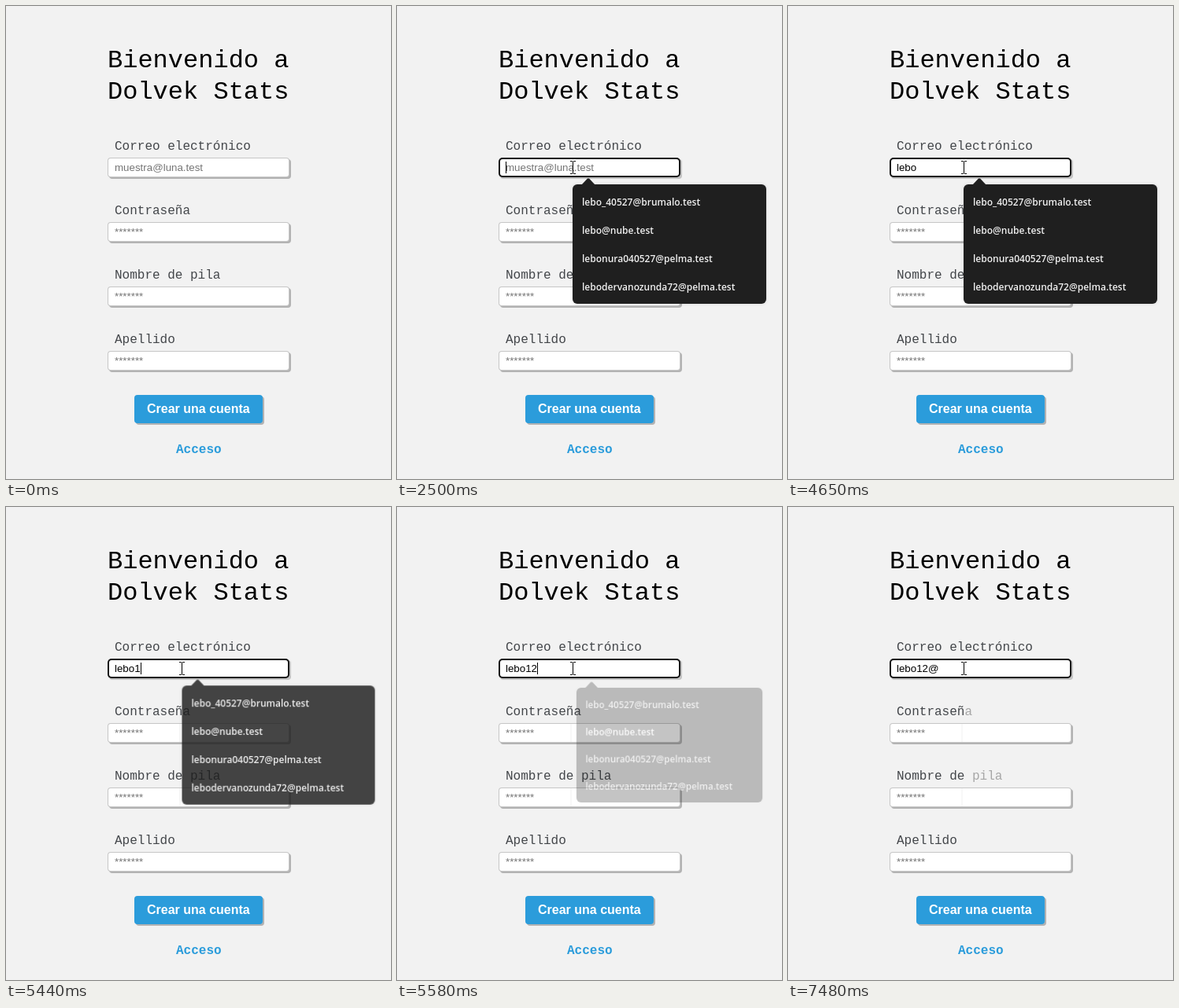
An HTML page with a canvas for the animation above (8000 ms loop, 489 by 602 pixels).

```html
<!DOCTYPE html>
<html lang="es">
<head>
<meta charset="utf-8">
<title>Registro</title>
<style>
  html, body { margin: 0; width: 100%; height: 100%; overflow: hidden; background: #f2f2f2; }
  canvas { display: block; }
</style>
</head>
<body>
<canvas id="stage" width="489" height="602"></canvas>
<script>
const LOOP = 8000;
const CLICK = 1450;
const MONO = '"Liberation Mono", "Noto Sans Mono", monospace';
const SANS = '"Liberation Sans", Arial, sans-serif';
const POPUP_FONT = '600 12px "Open Sans", "Noto Sans", sans-serif';
const FIELD_FONT = '13.333px ' + SANS;
const BLUE = '#2b9cdb';

const canvas = document.getElementById('stage');
const ctx = canvas.getContext('2d');

const fields = [
  { label: 'Correo electrónico', hint: 'muestra@luna.test', y: 193 },
  { label: 'Contraseña', hint: '*******', y: 275, keep: 9 },
  { label: 'Nombre de pila', hint: '*******', y: 357, keep: 10 },
  { label: 'Apellido', hint: '*******', y: 439 }
];
const suggestions = [
  'lebo_40527@brumalo.test',
  'lebo@nube.test',
  'lebonura040527@pelma.test',
  'lebodervanozunda72@pelma.test'
];

const typing = [[2660, 'l'], [2780, 'le'], [2920, 'leb'], [3110, 'lebo'],
  [5390, 'lebo1'], [5560, 'lebo12'], [6980, 'lebo12@']];
const caretToggles = [CLICK, 1980, 2500, 3610, 4150, 4650, 5170, 6190, 6690, 7480];
// time, x, y
const pointerPath = [[180, 455, 604], [500, 359, 406], [720, 275, 234],
  [880, 228, 185], [1000, 228, 185], [1010, 229, 197], [1070, 229, 201], [1250, 223, 205]];

const clamp01 = v => Math.min(1, Math.max(0, v));
const progress = (t, from, to) => clamp01((t - from) / (to - from));

function text(g, str, x, y, font, color) {
  g.font = font;
  g.fillStyle = color;
  g.fillText(str, x, y);
}

function box(g, x, y, w, h, r, fill) {
  g.beginPath();
  g.roundRect(x, y, w, h, r);
  g.fillStyle = fill;
  g.fill();
}

function makePopup() {
  const layer = document.createElement('canvas');
  layer.width = canvas.width;
  layer.height = canvas.height;
  const g = layer.getContext('2d');
  g.shadowColor = 'rgba(0,0,0,.12)';
  g.shadowBlur = 4;
  box(g, 223, 227, 246, 152, 6, '#1f1f1f');
  g.shadowColor = 'transparent';
  g.beginPath();
  g.moveTo(234, 228);
  g.lineTo(242, 219.5);
  g.lineTo(244, 219.5);
  g.lineTo(252, 228);
  g.fill();
  suggestions.forEach((s, i) => text(g, s, 235, 254 + 36 * i, POPUP_FONT, '#efefef'));
  return layer;
}
const popup = makePopup();

function drawField(f, t) {
  const font = '16px ' + MONO;
  const faded = f.keep && t >= 5640;
  const head = faded ? f.label.slice(0, f.keep) : f.label;
  text(ctx, head, 138, f.y - 10, font, '#43464a');
  if (faded) {
    const x = 138 + ctx.measureText(head).width;
    text(ctx, f.label.slice(f.keep), x, f.y - 10, font, '#a6a6a6');
  }

  const focused = f === fields[0] && t >= CLICK;
  box(ctx, 131, f.y + 2, 231, 25, 4, focused ? '#c4c4c4' : '#b3b3b3');
  box(ctx, 129, f.y, 231, 25, focused ? 5 : 4, focused ? '#101010' : '#c6c6c6');
  const edge = focused ? 2 : 1;
  box(ctx, 129 + edge, f.y + edge, 231 - 2 * edge, 25 - 2 * edge, 3, '#fff');
  if (f.keep && t >= 5420) {
    ctx.fillStyle = '#f8f8f8';
    ctx.fillRect(220, f.y + 1, 2, 23);
  }

  let value = '';
  if (focused) for (const [at, str] of typing) if (t >= at) value = str;
  text(ctx, value || f.hint, 138, f.y + 17, FIELD_FONT, value ? '#000' : '#757575');
  if (focused && caretToggles.filter(at => t >= at).length % 2) {
    ctx.fillStyle = '#000';
    ctx.fillRect(138 + Math.round(ctx.measureText(value).width), f.y + 5, 1, 15);
  }
}

function drawPopup(t) {
  const closing = progress(t, 5397, 5645);
  const opening = progress(t, 1510, 1790);
  const hidden = t < 3000 ? 1 - opening : closing;
  if (hidden >= 1) return;
  const scale = 1 - 0.065 * Math.pow(hidden, 1.6);
  ctx.save();
  ctx.globalAlpha = 1 - hidden;
  ctx.translate(346, 303);
  ctx.scale(scale, scale);
  ctx.drawImage(popup, -346, -303);
  ctx.restore();
}

function pointerAt(t) {
  let i = 0;
  while (i < pointerPath.length - 2 && t > pointerPath[i + 1][0]) i++;
  const [t0, x0, y0] = pointerPath[i];
  const [t1, x1, y1] = pointerPath[i + 1];
  const k = progress(t, t0, t1);
  return [Math.round(x0 + (x1 - x0) * k), Math.round(y0 + (y1 - y0) * k)];
}

function drawArrow(x, y) {
  const outline = [[0, 0], [0, 16], [4, 12.5], [6.5, 18], [9, 17], [6.5, 11.5], [11.5, 11.5]];
  ctx.beginPath();
  outline.forEach(([dx, dy]) => ctx.lineTo(x + dx + 0.5, y + dy + 0.5));
  ctx.closePath();
  ctx.fillStyle = '#fff';
  ctx.fill();
  ctx.strokeStyle = '#000';
  ctx.lineWidth = 1;
  ctx.stroke();
}

function drawBeam(x, y) {
  ctx.fillStyle = '#000';
  ctx.fillRect(x, y - 7, 1, 15);
  for (const dy of [-8, 8]) {
    ctx.fillRect(x - 3, y + dy, 3, 1);
    ctx.fillRect(x + 1, y + dy, 3, 1);
  }
}

function drawPointer(t) {
  const [x, y] = pointerAt(t);
  const overField = x >= 129 && x < 360 && fields.some(f => y >= f.y && y < f.y + 25);
  (overField ? drawBeam : drawArrow)(x, y);
}

function draw(t) {
  ctx.fillStyle = '#f2f2f2';
  ctx.fillRect(0, 0, canvas.width, canvas.height);
  text(ctx, 'Bienvenido a', 129, 78, '32px ' + MONO, '#000');
  text(ctx, 'Dolvek Stats', 129, 118, '32px ' + MONO, '#000');
  fields.forEach(f => drawField(f, t));
  box(ctx, 165, 497, 163, 36, 4, '#b3b3b3');
  box(ctx, 163, 495, 163, 36, 4, BLUE);
  text(ctx, 'Crear una cuenta', 179, 518, 'bold 16px ' + SANS, '#fff');
  text(ctx, 'Acceso', 216, 569, 'bold 16px ' + MONO, BLUE);
  drawPopup(t);
  drawPointer(t);
}

let start;
function tick(now) {
  start ??= now;
  draw((now - start) % LOOP);
  requestAnimationFrame(tick);
}
draw(0);
requestAnimationFrame(tick);
</script>
</body>
</html>
```
